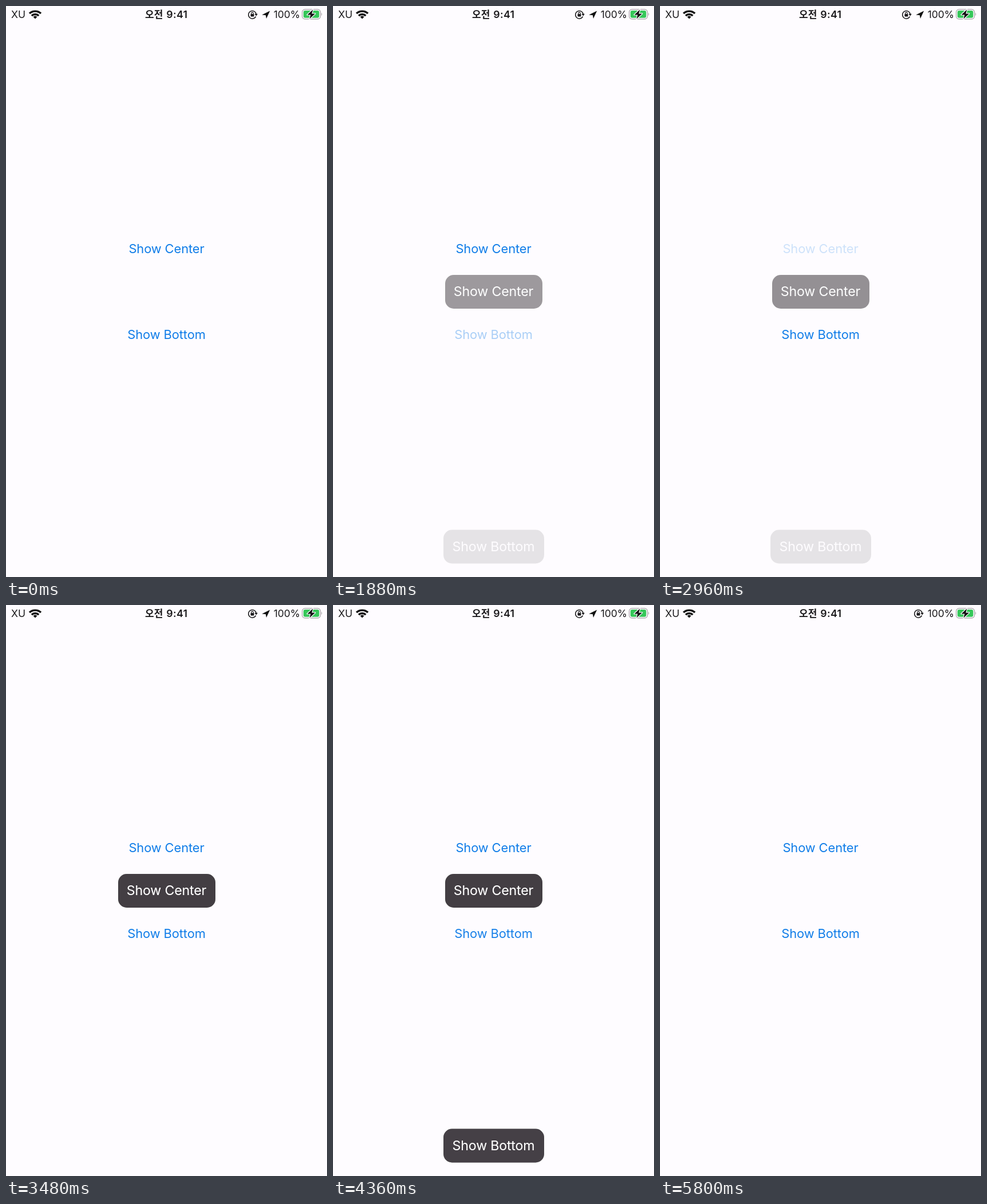
An HTML page for the animation above (5840 ms loop, 561 by 998 pixels).

```html
<!DOCTYPE html>
<html lang="ko">
<head>
<meta charset="utf-8">
<title>Toast demo</title>
<style>
  html, body { margin: 0; width: 100%; height: 100%; overflow: hidden; background: #fefcff; }
  svg { display: block; width: 561px; height: 998px; }
  text { font-family: Inter, "Noto Sans CJK KR", "Noto Sans CJK", sans-serif; }
  .button { font-size: 21.9px; letter-spacing: -.005em; fill: #107de8; text-anchor: middle; }
  .toast text { font-size: 23.2px; letter-spacing: -.008em; fill: #fff; text-anchor: middle; }
  .toast rect { fill: #060006; fill-opacity: .5; }
  .status { font-size: 17.6px; fill: #1b1a1c; }
  .clock { font-size: 17px; font-weight: 600; fill: #1b1a1c; }
  .clock.digits { font-size: 17.8px; letter-spacing: .02em; }
</style>
</head>
<body>
<svg id="stage" viewBox="0 0 561 998" xmlns="http://www.w3.org/2000/svg">
  <text class="status" x="9" y="21">XU</text>
  <g fill="none" stroke="#111" stroke-width="3.4">
    <path d="M41 13.1A14.5 14.5 0 0 1 61 13.1"/>
    <path d="M44.8 17A9 9 0 0 1 57.2 17"/>
    <path d="M51 22.4L47.6 18.9A4.9 4.9 0 0 1 54.4 18.9Z" fill="#111" stroke="none"/>
  </g>
  <text class="clock" x="243" y="20.6">오전</text>
  <text class="clock digits" x="317.5" y="20.8" text-anchor="end">9:41</text>

  <g id="lock" fill="none" stroke="#1b1a1c" stroke-width="1.5">
    <path d="M436.6 18.4A6.8 6.8 0 1 1 437.2 14"/>
    <path d="M434.4 13.8H440L437.2 17.4Z" fill="#1b1a1c" stroke="none"/>
    <rect x="427.5" y="14" width="6" height="4.6" rx=".8" fill="#1b1a1c" stroke="none"/>
    <path d="M428.7 14.4V13A1.8 1.8 0 0 1 432.3 13V14.4" stroke-width="1.2"/>
  </g>
  <path id="arrow" d="M461.3 8.6L455 22L453.8 16L447.2 15.6Z" fill="#111"/>
  <text class="status" x="514" y="21" text-anchor="end" letter-spacing="-.1">100%</text>

  <rect x="517.6" y="5.9" width="32" height="17" rx="5" fill="none" stroke="#a5a3a6" stroke-width="1.2"/>
  <path d="M551.2 11.6Q553.4 14.4 551.2 17.2Z" fill="#a5a3a6"/>
  <rect x="519.8" y="8.1" width="27.6" height="12.6" rx="3" fill="#35c759"/>
  <path d="M536.4 6.2L526.6 15.4H532.4L530.4 22.6L540.2 13.4H534.4Z"
        fill="#111" stroke="#fefcff" stroke-width="2.4" paint-order="stroke" stroke-linejoin="round"/>
</svg>
<script>
  const LOOP = 5840, STEP = 40;
  const FADE = 250, SHOWN = 970;
  const ARROW_OFF = 4480, LOCK_SHIFT = 21;
  const MID = 280.5;

  // taps: [finger down, finger up] in ms; each release raises a new toast
  const controls = [
    { label: 'Show Center', y: 432.1, box: [196, 470, 170],
      taps: [[760, 835], [2700, 2770], [2920, 3000], [3740, 3830], [3985, 4035]] },
    { label: 'Show Bottom', y: 582.1, box: [193, 915.5, 176],
      taps: [[1700, 1810], [3500, 3580], [4060, 4140]] }
  ];

  const stage = document.getElementById('stage');
  const arrow = document.getElementById('arrow');
  const lock = document.getElementById('lock');

  function add(parent, tag, attrs, text = '') {
    const node = document.createElementNS('http://www.w3.org/2000/svg', tag);
    for (const key in attrs) node.setAttribute(key, attrs[key]);
    node.textContent = text;
    return parent.appendChild(node);
  }

  function addToast(label, [x, y, width]) {
    const group = add(stage, 'g', { class: 'toast' });
    add(group, 'rect', { x, y, width, height: 59, rx: 15 });
    add(group, 'text', { x: MID, y: y + 37.4 }, label);
    return group;
  }

  for (const c of controls) {
    c.button = add(stage, 'text', { class: 'button', x: MID, y: c.y }, c.label);
  }
  for (const c of controls) {
    c.toasts = c.taps.map(() => addToast(c.label, c.box));
  }

  function ease(x) {
    const p = Math.min(1, Math.max(0, x));
    return p * p * (3 - 2 * p);
  }

  const toastAlpha = age => ease(age / FADE) - ease((age - SHOWN) / FADE);

  function buttonAlpha(taps, t) {
    const last = taps.filter(([down]) => down <= t).pop();
    return last ? .2 + .8 * ease((t - last[1]) / FADE) : 1;
  }

  function draw(t) {
    for (const { button, toasts, taps } of controls) {
      button.style.opacity = buttonAlpha(taps, t);
      toasts.forEach((toast, i) => {
        toast.style.opacity = toastAlpha(t - taps[i][1]);
      });
    }
    const located = t < ARROW_OFF;
    arrow.style.opacity = located ? 1 : 0;
    lock.setAttribute('transform', `translate(${located ? 0 : LOCK_SHIFT} 0)`);
  }

  const start = performance.now();
  function tick() {
    const t = Math.max(0, performance.now() - start) % LOOP;
    draw(Math.floor(t / STEP) * STEP);
    requestAnimationFrame(tick);
  }
  tick();
</script>
</body>
</html>
```
